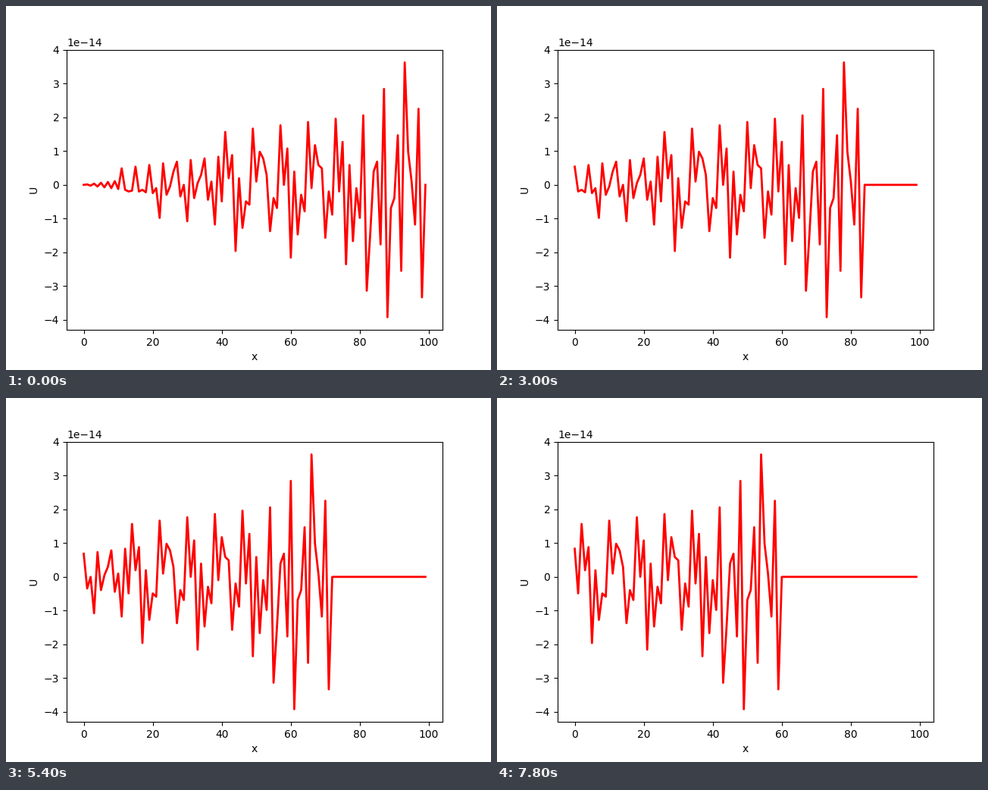
Write a matplotlib script that moves like this. It is 640 px wide and 480 px high and loops after 8 s.

```python
import math

import matplotlib.pyplot as plt
import numpy as np
from matplotlib.animation import FuncAnimation

N = 100
FRAMES = 40
STEP_MS = 200

# Rounding residue of sin(pi * n), with a zero boundary on the right
x = np.arange(N)
wave = np.array([math.sin(math.pi * n) for n in range(N)])
wave[-1] = 0.0


def shifted(k):
    """The wave moved k cells to the left, zeros entering from the right."""
    u = np.zeros(N)
    u[:N - k] = wave[k:]
    return u


fig, ax = plt.subplots(figsize=(6.4, 4.8), dpi=100)
line, = ax.plot(x, wave, color="red", linewidth=2)
ax.set_xlabel("x")
ax.set_ylabel("U")
# Keep the limits fitted to the first state
ax.set_xlim(ax.get_xlim())
ax.set_ylim(ax.get_ylim())


def update(k):
    line.set_ydata(shifted(k))
    return line,


anim = FuncAnimation(fig, update, frames=FRAMES, interval=STEP_MS,
                     init_func=lambda: update(0), repeat=True, repeat_delay=0)
plt.show()
```
